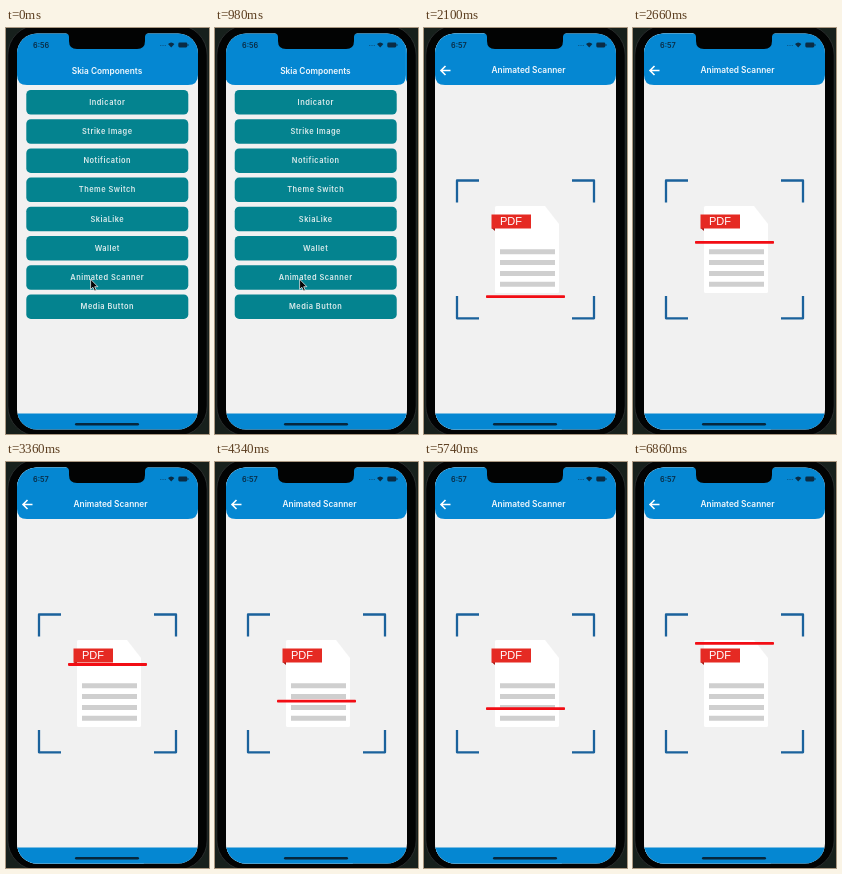
An HTML page that plays this animation: 203x406 px, repeating every 7 s.

```html
<!DOCTYPE html>
<html lang="en">
<head>
<meta charset="utf-8">
<title>Animated Scanner</title>
<style>
  html, body { margin: 0; width: 100%; height: 100%; overflow: hidden; background: #0b0d0d; }
  svg { display: block; width: 100vw; height: 100vh; }
  text { font-family: Inter, "Open Sans", sans-serif; font-weight: 600; fill: #fff; }
  .title { font-size: 8.3px; text-anchor: middle; fill: #f0f7fc; }
  .label { font-size: 7.4px; letter-spacing: .5px; text-anchor: middle; fill: #dcebec; }
  .clock { font-size: 7.3px; fill: #0a2c45; }
  .blue { fill: #0587d2; }
  .paper { fill: #f1f1f1; }
  .button { fill: #04838f; }
  .brackets { fill: none; stroke: #1b629c; stroke-width: 2.3; stroke-linejoin: round; }
  .pdf { font: 11px "Liberation Sans", Arial, sans-serif; text-anchor: middle; }
</style>
</head>
<body>
<svg viewBox="0 0 203 406" preserveAspectRatio="none">
  <defs>
    <clipPath id="screen"><rect x="11" y="5.5" width="181" height="396" rx="20"/></clipPath>
    <g id="page">
      <rect class="paper" x="11" y="0" width="181" height="406"/>
      <path class="blue" d="M11 0H192V47Q192 57 182 57H21Q11 57 11 47Z"/>
      <rect class="blue" x="11" y="385.5" width="181" height="20"/>
    </g>
  </defs>

  <rect width="203" height="406" fill="#17201c"/>
  <rect x="1.8" y="-3" width="199.4" height="411" rx="30" fill="#020303" stroke="#303334" stroke-width=".8"/>

  <g clip-path="url(#screen)">
    <g id="list">
      <use href="#page"/>
      <text class="title" x="101" y="45.6">Skia Components</text>
    </g>
    <g id="scanner">
      <use href="#page"/>
      <path d="M26.5 42.5H17M21.5 38L17 42.5L21.5 47" fill="none" stroke="#fff" stroke-width="1.6"/>
      <text class="title" x="104.5" y="45.4">Animated Scanner</text>
      <path class="brackets" d="M33 174.5V152.5H55M148 152.5H170V174.5M170 268V290.3H148M55 290.3H33V268"/>
      <path d="M72.5 178H121L135 196V263.5Q135 265 133.5 265H72.5Q71 265 71 263.5V179.5Q71 178 72.5 178Z" fill="#fff"/>
      <path d="M67.5 200L71 203V200Z" fill="#a31b18"/>
      <rect x="67.5" y="186.5" width="39.5" height="14" fill="#e52a23"/>
      <text class="pdf" x="87" y="197.4">PDF</text>
      <path d="M76 223.8H131M76 234.6H131M76 245.4H131M76 256.2H131" stroke="#cfcfcf" stroke-width="5"/>
      <rect id="beam" x="62" y="-1.4" width="79" height="2.8" rx=".8" fill="#f20d14"/>
    </g>
    <text id="clock" class="clock" x="27" y="19.8">6:56</text>
    <g fill="#0a2c45">
      <path d="M162 16Q165.200 13 168.400 16L165.200 19.500Z"/>
      <rect x="172.300" y="14.600" width="9" height="4.800" rx="1.300"/>
      <rect x="181.600" y="16" width=".8" height="2"/>
      <path d="M154 17.500H160" stroke="#0a4f7c" stroke-width=".8" stroke-dasharray=".9 .8"/>
    </g>
    <rect x="69" y="395" width="64" height="2.400" rx="1.200" fill="#06273d"/>
  </g>

  <path d="M60 5H142Q139 6 139 9V13Q139 21 131 21H71Q63 21 63 13V9Q63 6 60 5Z" fill="#020303"/>
  <path id="cursor" d="M0 0V10L2.300 8L4 11.700L5.700 11L4.100 7.400H7.300Z" fill="#050505" stroke="#fff" stroke-width=".7"/>
</svg>
<script>
  const LOOP = 7000;
  const PUSH_START = 980, PUSH_DECAY = 93, PUSH_END = 1900;
  const SCREEN_WIDTH = 181, PARALLAX = 0.3;
  const SCAN_START = 1139, SCAN_TIME = 966, SCAN_TOP = 174, SCAN_HEIGHT = 95;
  const CURSOR_HIDE = 1750, MINUTE_CHANGE = 1100;

  const byId = id => document.getElementById(id);
  const [list, scanner, beam, clock, cursor] =
    ["list", "scanner", "beam", "clock", "cursor"].map(byId);
  const move = (el, x, y = 0) => el.setAttribute("transform", `translate(${x} ${y})`);
  const show = (el, on) => el.setAttribute("visibility", on ? "visible" : "hidden");

  const items = ["Indicator", "Strike Image", "Notification", "Theme Switch",
    "SkiaLike", "Wallet", "Animated Scanner", "Media Button"];
  list.insertAdjacentHTML("beforeend", items.map((name, i) => {
    const y = 62 + i * 29.2;
    return `<rect class="button" x="20.3" y="${y}" width="162" height="24.5" rx="4.5"/>
      <text class="label" x="101.3" y="${y + 14.8}">${name}</text>`;
  }).join(""));

  function scanY(t) {
    const phase = Math.max(0, t - SCAN_START) / SCAN_TIME % 2;
    return SCAN_TOP + SCAN_HEIGHT * (1 - Math.abs(1 - phase));
  }

  function render(t) {
    const pushed = t >= PUSH_START;
    const left = !pushed ? 1 : t < PUSH_END ? Math.exp((PUSH_START - t) / PUSH_DECAY) : 0;
    show(scanner, pushed);
    move(scanner, SCREEN_WIDTH * left);
    move(list, -SCREEN_WIDTH * PARALLAX * (1 - left));
    move(beam, 0, scanY(t));
    clock.textContent = t < MINUTE_CHANGE ? "6:56" : "6:57";
    show(cursor, t < CURSOR_HIDE);
    move(cursor, 84.6, 251.3);
  }

  function tick() {
    render(performance.now() % LOOP);
    requestAnimationFrame(tick);
  }
  tick();
</script>
</body>
</html>
```
